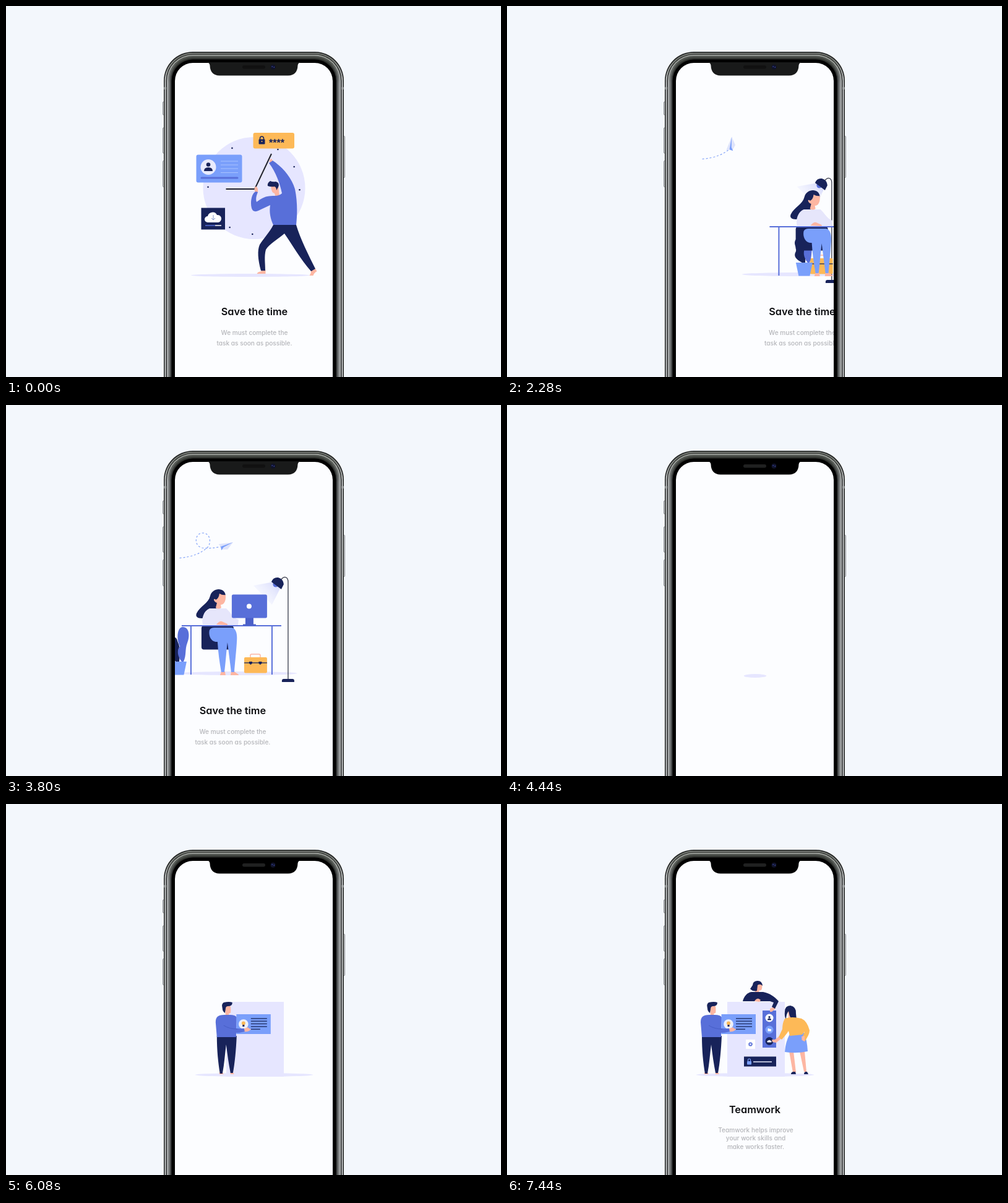
An HTML page for the animation above (8 s loop, 800 by 600 pixels).

```html
<!DOCTYPE html>
<html lang="en">
<head>
<meta charset="utf-8">
<title>Onboarding slides</title>
<style>
  html, body { margin: 0; width: 100%; height: 100%; overflow: hidden; background: #f3f7fc; }
  svg { display: block; width: 100%; height: 100%; }
  text { font-family: Inter, Lato, sans-serif; font-feature-settings: "cv11"; text-anchor: middle; }
  .title { font-size: 16.3px; font-weight: 600; fill: #0c0d10; }
  .body { font-size: 10.1px; font-weight: 500; fill: #b4b5b9; }
  .stars { font: bold 16px "Liberation Sans", sans-serif; }
  .lilac { fill: #e6e6ff; }
  .navy { fill: #18235a; }
  .blue { fill: #586fd9; }
  .sky { fill: #7a9ffb; }
  .skin { fill: #fdb6a2; }
  .gold { fill: #fdb957; }
  .white { fill: #fff; }
  .line { fill: none; }
</style>
</head>
<body>
<svg viewBox="0 0 800 600">
  <defs>
    <clipPath id="screen"><rect x="273" y="92" width="255" height="560" rx="29"/></clipPath>
    <linearGradient id="beam" x1="472" y1="288" x2="448" y2="310" gradientUnits="userSpaceOnUse">
      <stop stop-color="#d9dcfb"/><stop offset="1" stop-color="#eef0ff" stop-opacity=".5"/>
    </linearGradient>
  </defs>

  <!-- Phone -->
  <g fill="#d9dcdf" stroke="#6b6e70" stroke-width=".8">
    <rect x="253.500" y="155" width="4" height="21" rx="1"/>
    <rect x="253.500" y="197" width="4" height="41" rx="1"/>
    <rect x="253.500" y="250.500" width="4" height="42" rx="1"/>
    <rect x="543.500" y="210.500" width="4" height="67" rx="1"/>
  </g>
  <g id="shell"></g>
  <path d="M255.500 133h3.500M542 133h3.500" stroke="#a5a9a9" stroke-width="4"/>
  <rect x="273" y="92" width="255" height="560" rx="29" fill="#fcfdff"/>

  <g clip-path="url(#screen)">
    <!-- Clock slide -->
    <g data-out="472">
      <circle class="lilac" cx="401" cy="294.500" r="82.500"/>
      <g id="dots" class="navy"></g>
      <path class="line" d="M355.500 296H402L429 239" stroke="#22232b" stroke-width="2"/>
    </g>
    <g data-out="541">
      <rect class="navy" x="315.500" y="326.500" width="38.500" height="35"/>
      <path class="white" d="M326 350a5 5 0 0 1 0-10a8 8 0 0 1 15-2a6 6 0 0 1 2 12z"/>
      <path class="line" d="M335 338v8m-3-3l3 3l3-3" stroke="#8295ca"/>
      <path d="M322 355h16" stroke="#586fd9" stroke-width="1.500"/>
      <path d="M338 355h10" stroke="#fff" stroke-width="1.500"/>
    </g>
    <g data-out="445">
      <ellipse class="lilac" cx="395" cy="435.500" rx="96" ry="2.500"/>
      <g class="skin">
        <path d="M426 253q-1-5 3-6l3 5zM403 303q-3-8 0-11q5 0 4 10z"/>
        <path d="M412.500 427h7v6h-14q1-3 7-4zM493 428l7-3l2.500 4q-5 3-6 7h-6q3-4 2.500-8z"/>
        <path d="M428 291q6-5 12-1q1 10 2 17l-6 4l-2-8q-5 0-6-12z"/>
      </g>
      <path class="navy" d="M423 291q-1-5 4-8q4 2 9 1q7 2 4 9l-3 5q0-5-3-6q-6 1-11-1z"/>
      <path class="blue" d="M404 300C398 301 394 316 397 327C399 334 405 333 412 329L427 322C425 335 428 345 432 354H469C471 335 471 315 467 296C461 276 446 260 431 250L425 254C436 268 443 288 446 303C440 309 430 306 422 308C416 309 409 314 405 317C403 312 405 306 407 301Z"/>
      <path class="navy" d="M432 354H469C475 375 490 405 500 425L493 429C476 410 462 385 450 368C440 377 425 385 420 394C417 405 419 415 419 428H412C407 410 406 395 410 386C416 376 426 366 432 354Z"/>
    </g>
    <g data-out="605">
      <rect class="sky" x="307.500" y="240.500" width="74" height="45" rx="3"/>
      <circle cx="327" cy="260.500" r="12.500" fill="#e8ebfd"/>
      <circle class="navy" cx="327" cy="256.500" r="3.300"/>
      <path class="navy" d="M320 267q0-6 7-6t7 6z"/>
      <path d="M347 251h28M347 257h28M347 263h28M347 269.500h28" stroke="#a9c2ff"/>
      <path d="M316 278h58" stroke="#586fd9" stroke-width="3" stroke-linecap="round"/>
    </g>
    <g data-out="443">
      <rect class="gold" x="399.500" y="205" width="66.500" height="25.500" rx="3"/>
      <rect class="navy" x="408.500" y="215.500" width="10" height="8" rx="1"/>
      <path class="line" d="M410.500 216v-2a3 3 0 0 1 6 0v2" stroke="#18235a" stroke-width="1.600"/>
      <circle class="gold" cx="413.500" cy="219" r="1"/>
      <text class="stars navy" x="437.500" y="227">****</text>
    </g>
    <g data-out="498">
      <text class="title" x="401.500" y="500">Save the time</text>
      <text class="body" x="401.500" y="532">We must complete the</text>
      <text class="body" x="401.500" y="549">task as soon as possible.</text>
    </g>

    <!-- Desk slide -->
    <g data-in="2665" data-out="3520"><ellipse class="lilac" cx="410" cy="434" rx="96" ry="3"/></g>
    <g data-in="2557" data-out="3520">
      <path d="M468 286L435 292L465 323L480 293Z" fill="url(#beam)"/>
      <circle class="blue" cx="471" cy="290" r="4.500"/>
      <path class="navy" d="M464 286Q467 278 475 279Q483 281 484 290L480 298Z"/>
      <path class="line" d="M480 282q4-5 8-3q3 2 3 7V444" stroke="#373a49" stroke-width="1.300"/>
      <path class="navy" d="M481 448v-2q0-3 3-3h14q3 0 3 3v2z"/>
    </g>
    <g data-in="2677" data-out="3520">
      <path class="line" d="M430 408v-3q0-2 2-2h12q2 0 2 2v3" stroke="#fdb6a2" stroke-width="1.500"/>
      <rect class="gold" x="420" y="408" width="37" height="25.500" rx="2"/>
      <path d="M420 417h37" stroke="#333b5d" stroke-width="1.300"/>
      <path class="navy" d="M428 415h5v3l-2.500 2l-2.500-2zM443.500 415h5v3l-2.500 2l-2.500-2z"/>
    </g>
    <g data-in="2894" data-out="3520">
      <path class="navy" d="M310 415C299 409 296 404 300 397C302 390 296 386 299 379C302 373 311 374 312 381C313 386 317 389 314 395C312 400 317 404 315 415Z"/>
      <path class="blue" d="M319 415C312 406 311 397 316 390C310 378 312 360 320 359C331 358 333 373 328 385C324 395 327 405 322 415Z"/>
      <path class="sky" d="M300 415h27l-4.500 21.500h-18z"/>
    </g>
    <g data-in="2791" data-out="3520">
      <rect class="navy" x="351" y="357" width="52" height="38.500" rx="4"/>
      <path class="skin" d="M383 431h6l1 6h-9zM399 431h5l7 5v1h-13z"/>
      <path class="sky" d="M364 364Q366 360 372 360H400C409 362 409 375 408 385C407 400 405 418 404 432H399C397 415 395 400 393 384C391 400 390 418 388 432H383C380 415 378 400 377 383C366 384 362 372 364 364Z"/>
      <path class="navy" d="M390 309C390 295 369 294 365 309C362 321 349 325 343 337C340 345 350 346 357 344C369 340 377 332 377 320Z"/>
      <path d="M364 329C354 333 351 346 353 355L410 356L411 347C402 345 398 335 391 329Z" fill="#e6e6fb"/>
      <path class="skin" d="M371 314q2-1 3 1q5-2 6-10q5 3 10 2q1 9-3 14q-2 2-5 2l1 5q-5 3-9 0l2-8q-5-2-5-6z"/>
      <path class="skin" d="M375 355q5-6 9-5l9 4v2z"/>
    </g>
    <g data-in="2768" data-out="3520">
      <path class="line" d="M319 357H480M334 357V436M465 357V436" stroke="#586fd9" stroke-width="2"/>
    </g>
    <g data-in="2861" data-out="3520">
      <path d="M422 343h13v12h-13z" fill="#4a5fc8"/>
      <path d="M418 355.500h21" stroke="#4a5fc8" stroke-width="2"/>
      <rect class="blue" x="400" y="306.500" width="57" height="38" rx="2.500"/>
      <circle class="white" cx="428" cy="325.500" r="4"/>
    </g>
    <g data-out="3520">
      <path id="trail" class="line" d="M315.500 247.500Q345 245 361 230C367 224 366 207 353 207C340 207 338 228 352 231Q365 233 382 229L402 222" stroke="#86a5f8" stroke-width="1.200"/>
      <g id="plane">
        <path d="M20 0L-3-5L-1 0L-1 5L8 8Z" fill="#dfe4fb"/>
        <path class="sky" d="M20 0L-1 0L-2 6L3 2.500Z"/>
      </g>
    </g>
    <g data-in="2693" data-out="3520">
      <text class="title" x="401.500" y="500">Save the time</text>
      <text class="body" x="401.500" y="532">We must complete the</text>
      <text class="body" x="401.500" y="549">task as soon as possible.</text>
    </g>

    <!-- Team slide -->
    <ellipse id="ground" class="lilac" cx="401" cy="438" ry="3"/>
    <rect id="board" class="lilac" x="356" width="93"/>
    <g data-in="6322">
      <path class="skin" d="M328 327h9q1 7 0 11l-3 1l1 4h-6zM319 434h5l2 3h-7zM337 434h4l2 3h-6z"/>
      <path class="navy" d="M324 331q-2-8 2-10q9-2 14 0q0 6-7 6q-4 0-4 5l-1 6q-4-3-4-7z"/>
      <path class="navy" d="M315 375H347C346 398 344 418 341 435H337C334 420 332 405 330 389C328 405 327 420 324 436H320C317 418 315 398 315 375Z"/>
      <path class="blue" d="M327 341C316 341 313 345 313 353L315 377H346L347 345Q345 341 336 341Z"/>
      <rect class="sky" x="346.500" y="340" width="55.500" height="32"/>
      <circle cx="358" cy="356" r="7.800" fill="#edf0fb"/>
      <circle class="gold" cx="358" cy="354.500" r="3"/>
      <path class="navy" d="M356.500 357h3v3h-3z"/>
      <path d="M370 347h26M370 351.300h26M370 355.600h26M370 360h26M370 364.300h15" stroke="#26376f" stroke-width="1.500"/>
      <path class="skin" d="M357 364l8-3l2 2l3 1q-2 5-13 4z"/>
      <path class="blue" d="M326 358Q335 364 359 363L360 368Q342 373 328 367Z"/>
      <path class="line" d="M326 358Q335 364 348 364" stroke="#4057bd" stroke-width=".7"/>
    </g>
    <g data-in="7340" data-dur="720">
      <path class="blue" d="M413 334h22v60h-22z"/>
      <circle class="white" cx="424" cy="346" r="6.500"/>
      <circle class="sky" cx="424" cy="365" r="6.500"/>
      <circle class="navy" cx="424" cy="383.500" r="6.500"/>
      <circle class="navy" cx="424" cy="344.500" r="1.600"/>
      <path class="navy" d="M421 349.500q0-3 3-3t3 3z"/>
      <path class="white" d="M421.500 363h2l1 1h2.500v3.500h-5.500zM421 385.500a1.500 1.500 0 0 1 1-2.700a2.300 2.300 0 0 1 4 0a1.500 1.500 0 0 1 1 2.700z"/>
    </g>
    <g data-in="7360" data-dur="720">
      <path class="white" d="M386 381h15v15h-15z"/>
      <circle class="line" cx="393.500" cy="388.500" r="2.100" stroke="#586fd9" stroke-width="1.500"/>
      <circle class="line" cx="393.500" cy="388.500" r="3.200" stroke="#586fd9" stroke-dasharray="1.200 1.310"/>
    </g>
    <g data-in="7380" data-dur="720">
      <path class="navy" d="M383 408.500h52v16h-52z"/>
      <rect class="sky" x="388" y="416" width="7" height="5.500" rx="1"/>
      <path class="line" d="M389.500 416v-2a2 2 0 0 1 4 0v2" stroke="#7a9ffb" stroke-width="1.200"/>
      <path d="M398 417h30" stroke="#e8ebfd" stroke-width="1.600"/>
    </g>
    <g data-in="7320" data-dur="720">
      <path class="skin" d="M401 291h11q1 6-1 10l-4 1l1 4h-7zM425 331l6-3l3 3l-6 5h-3z"/>
      <path class="navy" d="M413 294Q412 285 404 286Q397 287 397 293L393 299Q398 304 404 302L405 293Q409 290 413 294Z"/>
      <path class="navy" d="M395 304H414C425 306 433 312 439 319L433 331L428 328L431 321L425 319H381C383 311 388 305 395 304Z"/>
      <path class="skin" d="M400 319q3-5 7-4l3 2l-2 3z"/>
    </g>
    <g data-in="7400" data-dur="720">
      <path class="skin" d="M456 400h7l4 34h-5zM473 400h8l3 33h-4zM442 374l3 4l-10 8l-6-1l-1-4l5 0zM454 334h10q2 6 0 11l-4 4h-5z"/>
      <path class="navy" d="M449 336Q449 326 458 326Q468 328 467 339L468 349L459 347Q456 342 455 335Q451 340 451 349Q448 343 449 336ZM459 437q0-3 3-4h4l1 4zM480 437q0-3 2-4h3l2 4z"/>
      <path class="sky" d="M457 372L480 370Q485 382 486 400Q467 404 449 401Q450 385 457 372Z"/>
      <path class="gold" d="M449 347Q445 354 445 364L439 377L444 381Q452 372 455 367L457 375L477 373L481 368L476 381L481 384Q489 373 489 366Q485 351 476 347Q460 343 449 347Z"/>
      <path class="skin" d="M476 376l5-1v9l-4-2z"/>
    </g>
    <g data-in="7400" data-dur="760">
      <text class="title" x="400.500" y="499.500">Teamwork</text>
      <text class="body" x="402" y="530.500">Teamwork helps improve</text>
      <text class="body" x="402" y="544">your work skills and</text>
      <text class="body" x="402" y="558">make works faster.</text>
    </g>
  </g>

  <path id="notch" d="M325 91Q329 92 329.500 96Q330 112 345 112.500H456Q471 112 471.500 96Q472 92 476 91Z"/>
  <rect id="speaker" x="382" y="96" width="37" height="5.500" rx="2.700"/>
  <circle cx="431.500" cy="98.700" r="4" fill="#10132a"/>
  <path d="M429.500 98h1.500M432.500 99h1.500" stroke="#3a48a5" stroke-width="1.500"/>
</svg>

<script>
const LOOP = 8000, TRAVEL = 320, SLIDE = 1200, PLANE_LENGTH = 20;
const $ = id => document.getElementById(id);
const clamp = v => Math.min(1, Math.max(0, v));
const easeInOut = v => (v = clamp(v), v < .5 ? 2 * v * v : 1 - 2 * (1 - v) ** 2);
const easeOut = v => 1 - (1 - clamp(v)) ** 3;

// Nested rims, from the outer edge inwards: inset, colour along the top, colour along the sides.
$('shell').innerHTML = [
  [0, '#1d1f1e', '#222423'], [1.6, '#777b76', '#d0d3d4'], [3.4, '#3b3e3a', '#27292a'],
  [5, '#a9ada8', '#b4b7b7'], [6.5, '#50544f', '#858889'], [9, '#3c403b', '#5d6061'],
  [11, '#2a2c29', '#343637'], [12.6, '#000', '#000']
].map(([inset, top, side], i) => `
  <linearGradient id="rim${i}" x1="0" y1="${74 + inset}" x2="0" y2="125" gradientUnits="userSpaceOnUse">
    <stop offset=".2" stop-color="${top}"/><stop offset="1" stop-color="${side}"/>
  </linearGradient>
  <rect x="${255 + inset}" y="${74 + inset}" width="${291 - 2 * inset}" height="600" rx="${47 - inset}" fill="url(#rim${i})"/>`
).join('');

// Hour marks of the clock.
$('dots').innerHTML = Array.from({length: 12}, (_, hour) => {
  const angle = hour * Math.PI / 6 + .03;
  return `<circle cx="${400.5 + 74 * Math.sin(angle)}" cy="${295 - 74 * Math.cos(angle)}" r="1.3"/>`;
}).filter((_, hour) => hour !== 5).join('');

const layers = [...document.querySelectorAll('[data-in], [data-out]')].map(node => {
  const duration = +node.dataset.dur || SLIDE;
  return {node, duration, enter: node.dataset.in ? node.dataset.in - duration : -Infinity, leave: +node.dataset.out || Infinity};
});
const trail = $('trail'), flight = trail.getTotalLength() - PLANE_LENGTH;

function drawPlane(t) {
  const length = flight * clamp((t - 1930) / 1070);
  const tail = trail.getPointAtLength(length), nose = trail.getPointAtLength(length + PLANE_LENGTH);
  const angle = Math.atan2(nose.y - tail.y, nose.x - tail.x) * 180 / Math.PI;
  const dashes = Math.floor(length / 6), rest = Math.min(3, length - dashes * 6);
  trail.setAttribute('stroke-dasharray', '3 3 '.repeat(dashes) + rest + ' 999');
  $('plane').setAttribute('transform', `translate(${tail.x} ${tail.y}) rotate(${angle})`);
  trail.parentNode.style.display = t >= 1930 && t < 4800 ? '' : 'none';
}

function draw(now) {
  const t = now % LOOP;
  for (const {node, enter, leave, duration} of layers) {
    const x = TRAVEL * (1 - easeInOut((t - enter) / duration) - easeInOut((t - leave) / SLIDE));
    node.setAttribute('transform', `translate(${x} 0)`);
  }
  drawPlane(t);
  $('ground').setAttribute('rx', 95.5 * easeOut((t - 4400) / 600));
  const height = 121 * easeOut((t - 4840) / 880);
  $('board').setAttribute('y', 441 - height);
  $('board').setAttribute('height', height);
  const dark = t >= 4360;
  $('notch').setAttribute('fill', dark ? '#000' : '#191a1a');
  $('speaker').setAttribute('fill', dark ? '#202121' : '#111');
  requestAnimationFrame(draw);
}
requestAnimationFrame(draw);
</script>
</body>
</html>
```
